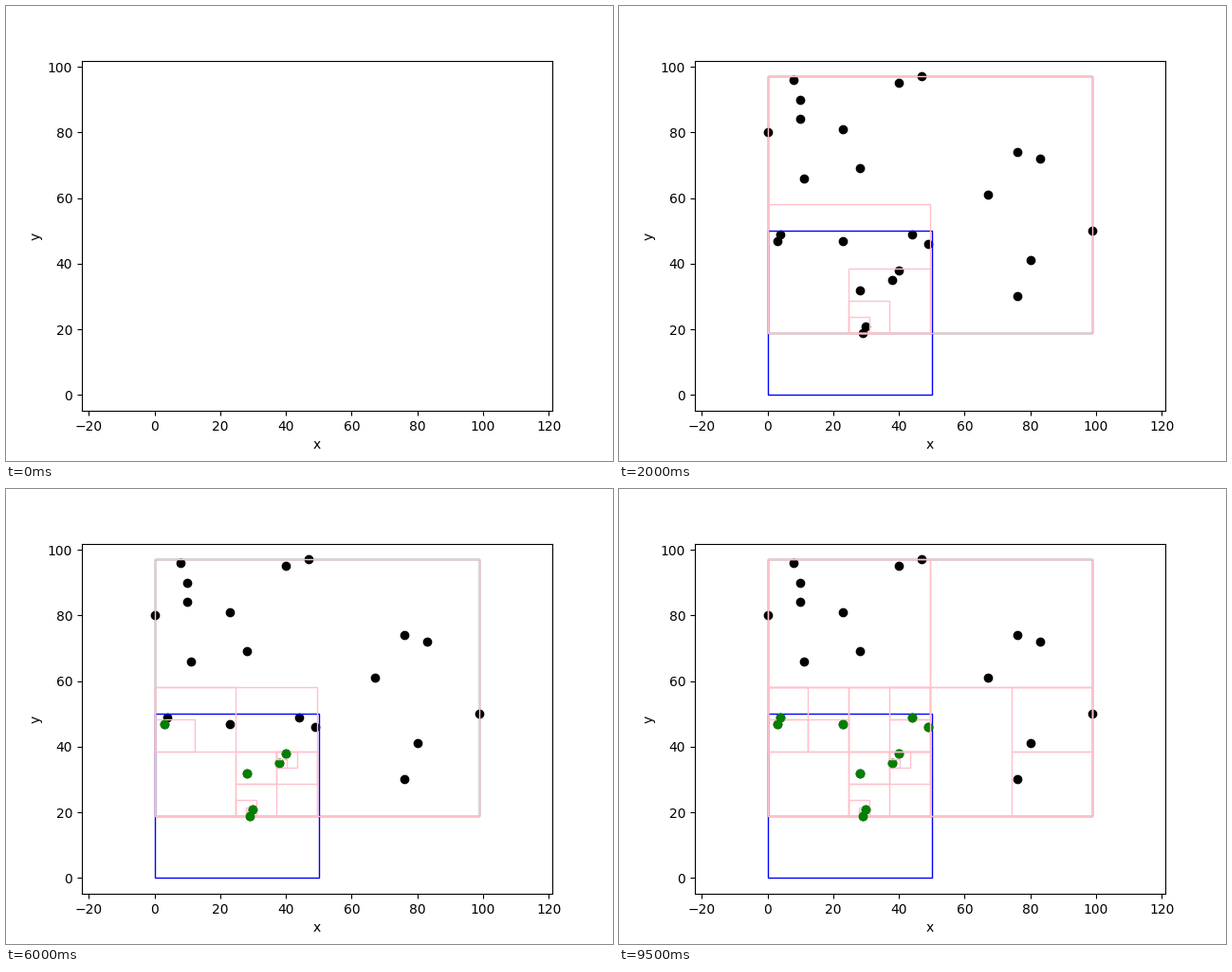
These frames come from a looping animation (640x480 px, 9.75 s). A matplotlib script:

```python
from math import sin

import matplotlib.pyplot as plt
from matplotlib.animation import FuncAnimation
from matplotlib.patches import Rectangle

STEP_MS = 250
QUERY = (0, 0, 50, 50)


def trail(x, y, dx, bend, dy, ks):
    """Points that climb evenly by dy while x drifts along a power curve."""
    return [(x + round(dx * k ** bend), y + dy * k) for k in ks]


def arch(x, y, width, height, count):
    """Points rising over a sine arch."""
    return [(x + round(width * k ** 0.8), y + round(height * sin(1.1 * k)))
            for k in range(count)]


points = (
    trail(8, 96, 1.5, 0.5, -6, (0, 1, 2, 5))
    + trail(28, 32, 10, 0.25, 3, range(3))
    + trail(3, 47, 1, 1, 2, range(2))
    + trail(29, 19, 1, 1, 2, range(2))
    + trail(76, 30, 4, 1, 11, range(2))
    + trail(23, 81, 5, 1, -12, range(2))
    + trail(44, 49, 5, 1, -3, range(2))
    + arch(67, 61, 9.2, 14.2, 3)
    + [(0, 80), (40, 95), (47, 97), (23, 47), (99, 50)]
)

fig, ax = plt.subplots(figsize=(6.4, 4.8), dpi=100)
ax.set_xlabel("x")
ax.set_ylabel("y")
steps = []  # artists in the order they appear


def add_box(box, color):
    x0, y0, x1, y1 = box
    rect = Rectangle((x0, y0), x1 - x0, y1 - y0, fill=False,
                     edgecolor=color, linewidth=1)
    steps.append(ax.add_patch(rect))


def add_dots(dots, color):
    steps.append(ax.scatter(*zip(*dots), color=color))


def overlaps(a, b):
    return a[0] <= b[2] and b[0] <= a[2] and a[1] <= b[3] and b[1] <= a[3]


def inside(point, box):
    return box[0] <= point[0] <= box[2] and box[1] <= point[1] <= box[3]


def visit(box, held):
    """Search one quadtree node, recording every box and hit."""
    add_box(box, "pink")
    if not overlaps(box, QUERY):
        return
    if len(held) == 1:
        if inside(held[0], QUERY):
            add_dots(held, "green")
        return
    x0, y0, x1, y1 = box
    mx, my = (x0 + x1) / 2, (y0 + y1) / 2
    quarters = [(x0, y0, mx, my), (mx, y0, x1, my),
                (x0, my, mx, y1), (mx, my, x1, y1)]
    for quarter in quarters:
        part = [p for p in held if inside(p, quarter)]
        if part:
            visit(quarter, part)


xs, ys = zip(*points)
root = (min(xs), min(ys), max(xs), max(ys))
add_dots(points, "black")
add_box(root, "#333333")
add_box(QUERY, "blue")
visit(root, points)
ax.axis("equal")


def update(frame):
    for i, artist in enumerate(steps):
        artist.set_visible(i < frame)
    return steps


anim = FuncAnimation(fig, update, frames=len(steps) + 1, interval=STEP_MS,
                     repeat=True, repeat_delay=0)
plt.show()
```
